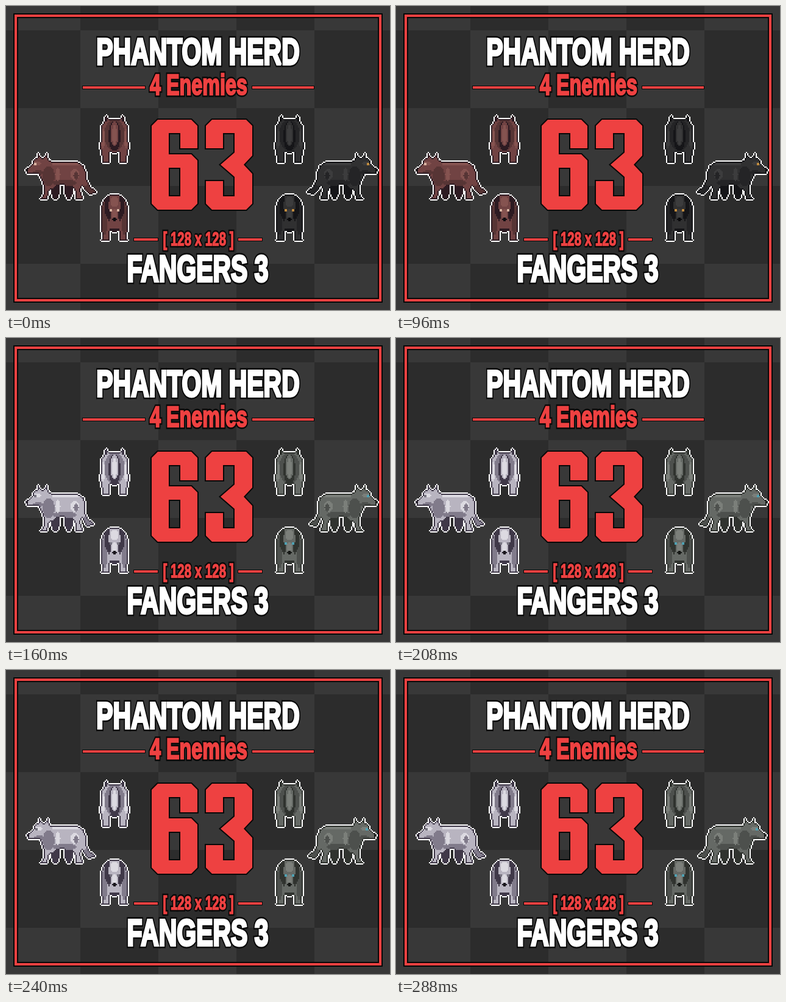
Animation of 630x500 px, one loop 0.32 s. Source, as an HTML page with a canvas:

```html
<!DOCTYPE html>
<html lang="en">
<head>
<meta charset="utf-8">
<title>Sprite cover</title>
<style>
html, body { margin: 0; width: 100%; height: 100%; overflow: hidden; background: #2c2c2c; }
canvas { display: block; }
</style>
</head>
<body>
<canvas id="stage" width="630" height="500"></canvas>
<script>
const W = 630, H = 500, CELL = 2, AXIS = 178;
const RED = '#ee4141', INK = '#080808';
const stage = document.getElementById('stage').getContext('2d');

// Closes a half outline with its mirror image.
const fold = (half, flip) => [...half, ...[...half].reverse().map(flip)];
const foldX = half => fold(half.map(([dx, y]) => [AXIS + dx, y]), ([x, y]) => [2 * AXIS - x, y]);
const pairX = blobs => blobs.flatMap(([tone, dx, ...rest]) =>
  (dx ? [dx, -dx] : [0]).map(d => [tone, AXIS + d, ...rest]));

// Blobs are [tone, x, y, rx, ry]; tones: 0 dark, 1 shade, 2 base, 3 light, 4 eye, 5 black.
const SIDE = {
  box: [28, 238, 154, 322],
  under: [[0, 81, 302, 7, 16], [0, 103, 300, 7, 18]],
  outline: [[32, 269], [42, 262], [46, 252], [52, 249], [53, 242], [58, 250], [62, 250],
    [67, 242], [70, 253], [76, 257], [118, 257], [127, 263], [131, 272], [133, 286],
    [139, 298], [147, 304], [147, 308], [136, 310], [125, 296], [122, 303], [127, 318],
    [113, 318], [115, 308], [109, 296], [84, 294], [70, 304], [68, 318], [56, 318],
    [62, 309], [62, 296], [54, 277], [34, 276]],
  over: [[1, 70, 280, 10, 16], [1, 96, 291, 20, 6], [1, 137, 302, 12, 8], [3, 98, 260, 23, 3],
    [3, 85, 277, 4, 10], [3, 113, 277, 7, 9], [1, 115, 279, 4, 6], [3, 50, 259, 8, 4],
    [1, 53, 274, 9, 4], [4, 48, 260, 2, 2], [5, 34, 270, 2, 2]]
};
const BACK = {
  box: [150, 174, 206, 262],
  under: pairX([[0, 0, 234, 10, 8]]),
  outline: foldX([[0, 187], [9, 187], [14, 178], [17, 190], [22, 198], [22, 216], [24, 232],
    [20, 251], [21, 258], [9, 258], [7, 240]]),
  over: pairX([[1, 0, 212, 17, 26], [3, 19, 218, 3, 15], [0, 0, 214, 10, 25],
    [2, 0, 210, 7, 20], [3, 0, 212, 4, 16], [0, 14, 184, 3, 7]])
};
const FRONT = {
  box: [150, 306, 206, 390],
  under: pairX([[0, 0, 360, 12, 12]]),
  outline: foldX([[0, 310], [7, 310], [13, 314], [18, 320], [22, 330], [22, 346], [23, 362],
    [20, 376], [21, 385], [9, 385], [7, 366]]),
  over: pairX([[1, 16, 350, 5, 26], [0, 12, 328, 5, 18], [2, 0, 332, 10, 22], [3, 0, 322, 7, 9],
    [0, 9, 344, 3, 9], [3, 0, 342, 4, 8], [4, 6, 336, 2, 2], [5, 0, 351, 4, 3]])
};

const BROWN = ['#2d1b22', '#573535', '#714343', '#855350', '#d9b4a2', '#100b10'];
const BLACK = ['#151518', '#242426', '#303031', '#3c3c3d', '#c08b3e', '#09090b'];
const WHITE = ['#403949', '#817b8b', '#b8b4c0', '#dcdae1', '#777480', '#18151c'];
const GREY = ['#30332f', '#4d504d', '#656965', '#7b7f7a', '#4ea0b2', '#151715'];

const POSES = [
  { until: 160, head: 0, tail: 0, top: 0, coats: [BROWN, BLACK] },
  { until: 240, head: 0, tail: -4, top: 2, coats: [WHITE, GREY] },
  { until: 320, head: 2, tail: -2, top: 2, coats: [WHITE, GREY] }
];

function polygon(points) {
  const path = new Path2D();
  for (const [x, y] of points) path.lineTo(x, y);
  path.closePath();
  return path;
}

// Samples a sprite on a coarse grid and returns a lookup of tones.
function rasterize({ box, under, outline, over }, move) {
  const [x0, y0, x1, y1] = box, cells = new Map();
  const blob = ([tone, x, y, rx, ry]) => {
    const path = new Path2D();
    path.ellipse(...move(x, y), rx, ry, 0, 0, 2 * Math.PI);
    return [tone, path];
  };
  const body = polygon(outline.map(([x, y]) => move(x, y)));
  const below = under.map(blob), above = over.map(blob);
  for (let y = y0; y < y1; y += CELL)
    for (let x = x0; x < x1; x += CELL) {
      const hit = ([, path]) => stage.isPointInPath(path, x + 1, y + 1);
      const inBody = stage.isPointInPath(body, x + 1, y + 1);
      const found = (inBody ? above : below).filter(hit).pop();
      if (found || inBody) cells.set(x + y * W, found ? found[0] : 2);
    }
  return { box, cells };
}

function paintSprite(ctx, { box, cells }, coat, place) {
  const [x0, y0, x1, y1] = box;
  const steps = [-CELL, CELL, -CELL * W, CELL * W];
  for (let y = y0; y < y1; y += CELL)
    for (let x = x0; x < x1; x += CELL) {
      const key = x + y * W, tone = cells.get(key);
      const near = steps.filter(s => cells.has(key + s)).length;
      if (tone === undefined && !near) continue;
      ctx.fillStyle = tone === undefined ? '#fff' : near < 4 ? coat[0] : coat[tone];
      ctx.fillRect(place(x), y, CELL, CELL);
    }
}

function bar(ctx, x, y, w) {
  ctx.fillStyle = INK;
  ctx.fillRect(x, y, w, 6);
  ctx.fillStyle = RED;
  ctx.fillRect(x + 1, y + 1, w - 2, 4);
}

function label(ctx, text, x, y, size, color, weight) {
  ctx.save();
  ctx.translate(x, y);
  ctx.scale(0.66, 1);
  ctx.font = `bold ${size}px "Liberation Sans", Arial, sans-serif`;
  ctx.textAlign = 'center';
  ctx.lineJoin = 'miter';
  ctx.miterLimit = 2;
  ctx.strokeStyle = INK;
  ctx.lineWidth = weight + 5;
  ctx.strokeText(text, 0, 0);
  ctx.strokeStyle = ctx.fillStyle = color;
  ctx.lineWidth = weight;
  ctx.strokeText(text, 0, 0);
  ctx.fillText(text, 0, 0);
  ctx.restore();
}

function paintNumber(ctx) {
  const six = polygon([[249, 187], [304, 187], [314, 197], [314, 234], [286, 234], [286, 209],
    [267, 209], [267, 244], [304, 244], [314, 254], [314, 325], [304, 335], [249, 335],
    [239, 325], [239, 197]]);
  six.rect(267, 266, 19, 47);
  const three = polygon(fold([[352, 261], [375, 241], [375, 209], [356, 209], [356, 234],
    [328, 234], [328, 197], [338, 187], [394, 187], [404, 197], [404, 246], [390, 261]],
    ([x, y]) => [x, 522 - y]));
  for (const digit of [six, three]) {
    ctx.strokeStyle = INK;
    ctx.lineWidth = 4;
    ctx.stroke(digit);
    ctx.fillStyle = RED;
    ctx.fill(digit, 'evenodd');
  }
}

function paintCover(ctx) {
  for (let row = 0; row < 5; row++)
    for (let col = 0; col < 5; col++) {
      ctx.fillStyle = (row + col) % 2 ? '#2c2c2c' : '#383838';
      ctx.fillRect(col * 128 - 6, row * 128 - 88, 128, 128);
    }
  for (const [color, width] of [[INK, 8], [RED, 4]]) {
    ctx.strokeStyle = color;
    ctx.lineWidth = width;
    ctx.strokeRect(16, 16, 598, 468);
  }
  label(ctx, 'PHANTOM HERD', 315, 96, 62, '#fff', 4);
  label(ctx, '4 Enemies', 316, 146, 49, RED, 2.5);
  label(ctx, '[ 128 x 128 ]', 315.5, 394, 31, RED, 1.5);
  label(ctx, 'FANGERS 3', 314.5, 453, 62, '#fff', 4);
  bar(ctx, 125, 131, 104);
  bar(ctx, 403, 131, 103);
  bar(ctx, 209, 381, 41);
  bar(ctx, 380, 381, 41);
  paintNumber(ctx);
}

function buildFrame({ head, tail, top, coats }) {
  const canvas = document.createElement('canvas');
  canvas.width = W;
  canvas.height = H;
  const ctx = canvas.getContext('2d');
  paintCover(ctx);

  const side = rasterize(SIDE, (x, y) =>
    x < 76 && y < 279 ? [x + head, y + head] : x > 130 && y > 280 ? [x + tail, y] : [x, y]);
  const back = rasterize(BACK, (x, y) => [x, y < 232 ? y + top : y]);
  const front = rasterize(FRONT, (x, y) => [x, y < 358 ? y + top : y]);

  const stay = x => x, mirror = x => 640 - x, shift = x => x + 287;
  const [left, right] = coats;
  for (const sprite of [side, back, front]) {
    paintSprite(ctx, sprite, left, stay);
    paintSprite(ctx, sprite, right, sprite === side ? mirror : shift);
  }
  return canvas;
}

const frames = POSES.map(buildFrame);
const start = performance.now();

function tick() {
  const t = (performance.now() - start) % 320;
  stage.drawImage(frames[POSES.findIndex(pose => t < pose.until)], 0, 0);
  requestAnimationFrame(tick);
}
tick();
</script>
</body>
</html>
```
